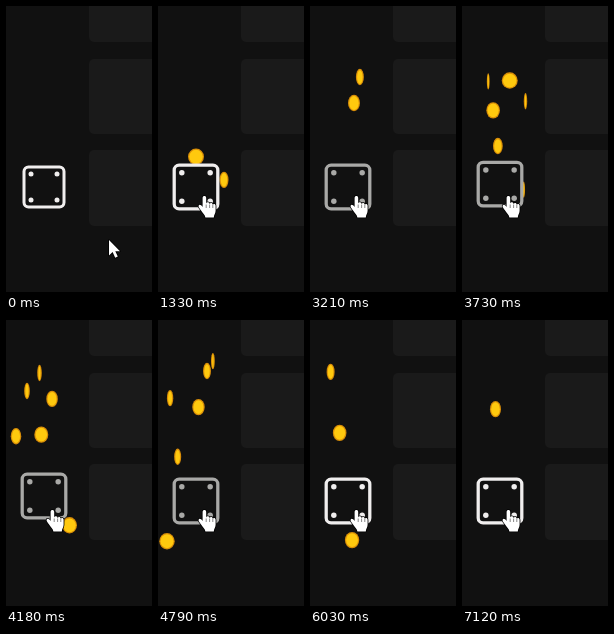
Write an HTML page with a canvas that moves like this. It is 146 by 286 pixels and loops after 7.18 s.

```html
<!DOCTYPE html>
<html lang="en">
<head>
<meta charset="utf-8">
<title>Coin button</title>
<style>
  html, body { margin: 0; width: 100%; height: 100%; overflow: hidden; background: #111; }
  canvas { display: block; width: 146px; height: 286px; }
</style>
</head>
<body>
<canvas id="stage"></canvas>
<script>
const W = 146, H = 286, LOOP = 7180;
const GRAVITY = 1850, SPIN = 7.64, RADIUS = 8;
const HOME = { x: 38, y: 181 };

// launch time (s), sideways speed, upward speed, spin phase
const COINS = [
  [0.33, -25, 635, 0.3], [0.655, 41.5, 635, 2.1], [0.695, 0, 635, 1.43],
  [1.44, -61, 635, 0.8], [1.95, 33, 650, 2], [2.1, -45, 630, 1.2],
  [2.715, 24, 680, 0.41], [3.034, 34, 640, 2.52], [3.22, 50, 640, 0.6],
  [3.31, -28, 640, 1.5], [3.452, 35, 640, 1.08], [3.584, -47, 660, 2.58],
  [3.665, -33, 690, 0.42], [3.732, -10, 700, 1], [3.943, 34, 650, 2.1],
  [4.074, -25.6, 724, 2.84], [4.155, -45.7, 524, 1.71], [4.25, -48, 690, 0.18],
  [4.296, 22.3, 720, 0.42], [4.499, 58, 750, 2.25], [4.6, 13, 670, 2.37],
  [4.8, 42, 740, 0.9], [4.92, -26, 720, 1.9], [5.05, 18, 778, 0.2],
  [5.221, 5, 700, 0.56], [5.388, -13, 700, 1.93], [5.487, -32, 740, 0.04],
  [6.12, -20, 610, 1.1], [6.596, -8.6, 660, -0.05]
];

const HAND = new Path2D("M46.6 202.5V192c0-2.6 3.6-2.6 3.6 0v5.4c.5-1.7 3.2-1.5 3.4.5" +
  ".7-1.5 3-1.1 3.2.7.8-1.1 2.8-.7 2.8 1.2v5c0 2.6-1.6 3.6-1.8 6.7h-8.4" +
  "c-.4-2.6-2.7-4.4-4.5-7.2-1.2-1.9-2.7-3.4-2.3-4.6.6-1.6 2.6-.7 4 1.2z");
const ARROW = new Path2D("M0 0V15.5L3.6 12.1 6.2 17.8 8.8 16.6 6.3 11.2H11z");

const canvas = document.getElementById("stage");
const ctx = canvas.getContext("2d");
const ratio = window.devicePixelRatio || 1;
canvas.width = W * ratio;
canvas.height = H * ratio;

const clamp = v => Math.max(0, Math.min(1, v));
const ease = v => v * v * (3 - 2 * v);

function box(x, y, w, h, r) {
  ctx.beginPath();
  ctx.roundRect(x, y, w, h, r);
}

function drawPanels() {
  ctx.fillStyle = "#1a1a1a";
  for (const [y, h] of [[-39, 75], [53, 75], [144, 76]]) {
    box(83, y, 80, h, 5);
    ctx.fill();
  }
}

function drawCoin(t, [start, vx, vy, phase]) {
  const age = t - start;
  if (age < 0) return;
  const x = HOME.x + vx * age;
  const y = HOME.y - vy * age + GRAVITY * age * age / 2;
  if (y > H + RADIUS) return;
  const rx = Math.max(1.4, RADIUS * Math.abs(Math.cos(phase + SPIN * age)));
  ctx.beginPath();
  ctx.ellipse(x, y, rx, RADIUS + 0.2, 0, 0, 7);
  ctx.fillStyle = "#d98e08";
  ctx.fill();
  ctx.beginPath();
  ctx.ellipse(x, y, Math.max(0.6, rx - 1.2), RADIUS - 1.1, 0, 0, 7);
  ctx.fillStyle = "#ffc90e";
  ctx.fill();
}

function drawButton(t) {
  const pressed = COINS.some(([s]) => t > s - 0.06 && t < s + 0.04);
  let hop = 0;
  for (const [s] of COINS) {
    const k = (t - s) / 0.1;
    if (k > 0 && k < 1) hop = Math.max(hop, 5 * Math.sin(Math.PI * Math.sqrt(k)));
  }
  const scale = 1 + 0.09 * ease(clamp((t - 0.22) / 0.1));
  const color = pressed ? "#a9a9a7" : "#f0eeee";
  ctx.save();
  ctx.translate(HOME.x, HOME.y - hop);
  ctx.scale(scale, scale);
  box(-20, -20, 40, 40, 4.5);
  ctx.fillStyle = "#111";
  ctx.fill();
  ctx.strokeStyle = color;
  ctx.lineWidth = 3;
  ctx.stroke();
  ctx.fillStyle = color;
  for (const x of [-13, 13]) for (const y of [-13, 13]) {
    ctx.beginPath();
    ctx.arc(x, y, 2.5, 0, 7);
    ctx.fill();
  }
  ctx.restore();
}

function drawCursor(t) {
  const k = ease(clamp((t - 0.04) / 0.26));
  const hand = t > 0.22;
  const shape = hand ? HAND : ARROW;
  ctx.save();
  if (hand) ctx.translate(57 * (1 - k) - 2, 44 * (1 - k));
  else ctx.translate(103 - 57 * k, 234 - 44 * k);
  ctx.lineJoin = "round";
  ctx.lineWidth = 1.6;
  ctx.strokeStyle = "#000";
  ctx.stroke(shape);
  ctx.fillStyle = "#fff";
  ctx.fill(shape);
  if (hand) {
    ctx.lineWidth = 0.7;
    ctx.strokeStyle = "#555";
    ctx.beginPath();
    for (const x of [50.2, 53.6, 56.8]) {
      ctx.moveTo(x, 198.5);
      ctx.lineTo(x, 202);
    }
    ctx.stroke();
  }
  ctx.restore();
}

function draw(now) {
  const t = (now % LOOP) / 1000;
  ctx.setTransform(ratio, 0, 0, ratio, 0, 0);
  ctx.fillStyle = "#111";
  ctx.fillRect(0, 0, W, H);
  drawPanels();
  for (const coin of COINS) drawCoin(t, coin);
  drawButton(t);
  drawCursor(t);
}

let begin;
function tick(now) {
  begin ??= now;
  draw(now - begin);
  requestAnimationFrame(tick);
}
draw(0);
requestAnimationFrame(tick);
</script>
</body>
</html>
```
